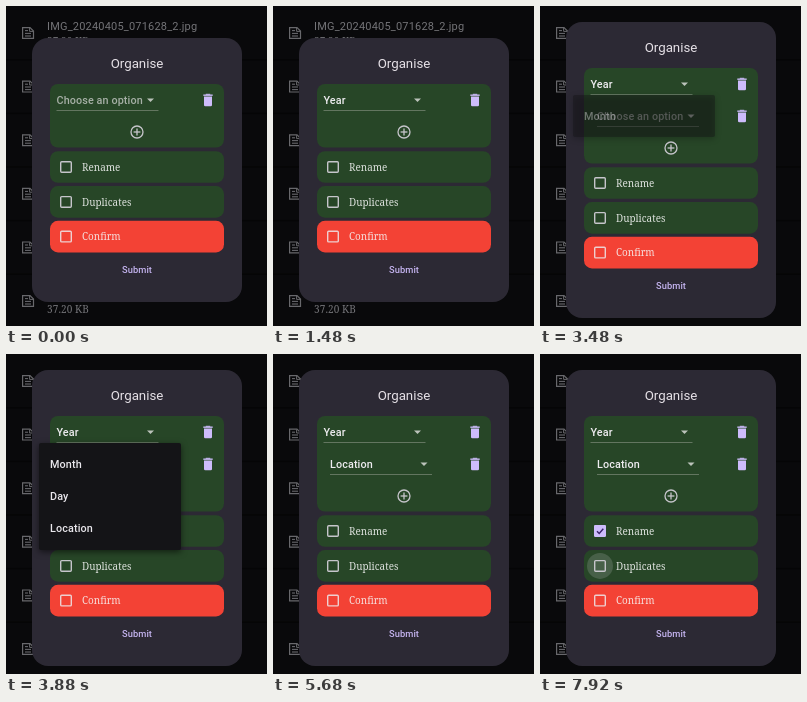
Animation of 261 by 320 pixels, one loop 8000 ms. Source, as an HTML page with a canvas:

```html
<!DOCTYPE html>
<html lang="en">
<head>
<meta charset="utf-8">
<title>Organise dialog</title>
<style>
html, body { margin: 0; width: 100%; height: 100%; overflow: hidden; background: #09090b; }
canvas { display: block; width: 261px; height: 320px; }
</style>
</head>
<body>
<canvas id="stage"></canvas>
<script>
const W = 261, H = 320, LOOP = 8000;
const canvas = document.getElementById('stage');
const ctx = canvas.getContext('2d');
const ratio = window.devicePixelRatio || 1;
canvas.width = W * ratio;
canvas.height = H * ratio;

const SANS = 'Roboto, sans-serif', SERIF = '"Noto Serif", serif';
const GREEN = '#274627', RED = '#f34235', LILAC = '#cdbcfb', LIGHT = '#eeecf0', GREY = '#c6c5cb';
const ADD_ROW = 2760, TICK = 6790;
const menus = [
  { open: 335, close: 1361, x: 33, y: 73, w: 135, items: ['Year', 'Month', 'Day', 'Location'] },
  { open: 3450, close: 4681, x: 33, y: 89, w: 142, items: ['Month', 'Day', 'Location'] }
];

const clamp = v => Math.max(0, Math.min(1, v));
const phase = (t, start, length) => clamp((t - start) / length);
const easeOut = p => 1 - (1 - p) ** 3;

function withAlpha(alpha, draw) {
  ctx.save();
  ctx.globalAlpha *= alpha;
  draw();
  ctx.restore();
}

function box(x, y, w, h, r, color) {
  ctx.beginPath();
  ctx.roundRect(x, y, w, h, r);
  ctx.fillStyle = color;
  ctx.fill();
}

function poly(points, color, stroke) {
  ctx.beginPath();
  points.forEach(([x, y]) => ctx.lineTo(x, y));
  if (stroke) {
    ctx.strokeStyle = color;
    ctx.lineWidth = stroke;
    ctx.stroke();
  } else {
    ctx.fillStyle = color;
    ctx.fill();
  }
}

// y is the vertical middle of the capitals
function label(str, x, y, size, color, { font = SANS, weight = 400, align = 'left', gap = 0 } = {}) {
  ctx.font = `${weight} ${size}px ${font}`;
  ctx.letterSpacing = gap + 'px';
  ctx.textAlign = align;
  ctx.fillStyle = color;
  ctx.fillText(str, x, y + size * 0.356);
}

function fileIcon(y) {
  const c = '#68686c';
  poly([[16.6, y - 5.4], [24, y - 5.4], [27.5, y - 1.9], [27.5, y + 5.4],
    [16.6, y + 5.4], [16.6, y - 6]], c, 1.2);
  poly([[23.6, y - 5], [23.6, y - 1.6], [27.4, y - 1.6]], c, 1);
  poly([[19, y - 2.4], [22, y - 2.4]], c, 1.1);
  poly([[19, y + 0.4], [25, y + 0.4]], c, 1.1);
  poly([[19, y + 3], [25, y + 3]], c, 1.1);
}

function fileList() {
  ctx.fillStyle = '#09090b';
  ctx.fillRect(0, 0, W, H);
  for (let i = 0; i < 6; i++) {
    const y = 27 + i * 53.6;
    ctx.fillStyle = '#050506';
    ctx.fillRect(0, y + 26, W, 1.5);
    fileIcon(y);
    label('IMG_20240405_071628_2.jpg', 41, y - 7, 11, '#747478', { gap: 0.19 });
    label('37.20 KB', 41, y + 8, 10, '#747478', { font: SERIF, gap: 0.1 });
  }
}

function trash(x, y) {
  box(x - 4, y - 3.4, 8, 9.6, [0, 0, 1.3, 1.3], LILAC);
  box(x - 4.7, y - 5.5, 9.4, 1.35, 0, LILAC);
  box(x - 2.2, y - 6.2, 4.4, 1, 0, LILAC);
}

function plus(x, y) {
  ctx.beginPath();
  ctx.arc(x, y, 6, 0, Math.PI * 2);
  ctx.strokeStyle = GREY;
  ctx.lineWidth = 1.3;
  ctx.stroke();
  poly([[x - 3.4, y], [x + 3.4, y]], GREY, 1.3);
  poly([[x, y - 3.4], [x, y + 3.4]], GREY, 1.3);
}

function dropdown(x, y, value) {
  label(value || 'Choose an option', x, y, 10.8, value ? LIGHT : '#a7b0a7', { weight: 500, gap: 0.1 });
  ctx.fillStyle = '#72836f';
  ctx.fillRect(x, y + 10, 102, 0.8);
  poly([[x + 90.5, y - 1.5], [x + 97.5, y - 1.5], [x + 94, y + 2]], '#bcc3bb');
  trash(202, y);
}

function ripple(t, start, x, y, rx, ry, alpha) {
  const fade = 1 - phase(t, start + 140, 220);
  if (t < start || !fade) return;
  const grow = 0.65 + 0.35 * easeOut(phase(t, start, 60));
  withAlpha(alpha * fade, () => {
    ctx.beginPath();
    ctx.ellipse(x, y, rx * grow, ry * grow, 0, 0, Math.PI * 2);
    ctx.fillStyle = '#dcd6e4';
    ctx.fill();
  });
}

function option(name, y, color, checked, pressAt, t) {
  box(44, y, 174, 31.6, 8, color);
  const mid = y + 15.8;
  if (pressAt) ripple(t, pressAt, 60, mid, 13, 13, 0.18);
  const edge = color === RED ? '#eecfd0' : GREY;
  ctx.beginPath();
  ctx.roundRect(54.7, mid - 5.3, 10.6, 10.6, 1);
  ctx.strokeStyle = edge;
  ctx.lineWidth = 1.4;
  ctx.stroke();
  if (checked) withAlpha(checked, () => {
    box(54, mid - 6, 12, 12, 1.4, LILAC);
    const a = [57, mid + 0.2], b = [59.2, mid + 2.5], c = [63.3, mid - 2.3];
    poly([a, b, c], '#38206b', 1.4);
  });
  label(name, 76, mid + 0.3, 9.9, color === RED ? '#f6dedc' : '#dfe3df', { font: SERIF });
}

function dialog(t) {
  const grown = t >= ADD_ROW;
  const top = grown ? 16 : 32;
  const bottom = H - 8 - (grown ? 0 : 16);
  box(26, top, 210, bottom - top, 16, '#2c2934');
  label('Organise', 131, top + 25, 13.3, '#e6e1e7', { align: 'center' });

  box(44, top + 46, 174, grown ? 95.5 : 63.5, 8, GREEN);
  dropdown(50.5, top + 62, t >= menus[0].close && 'Year');
  if (grown) dropdown(57, top + 94, t >= menus[1].close && 'Location');
  const plusY = grown ? 142 : 126;
  ripple(t, 2645, 131, plusY, 21, 11.5, 0.07);
  plus(131, plusY);

  const first = grown ? 161.2 : 145.2;
  option('Rename', first, GREEN, phase(t, TICK, 130), 6670, t);
  option('Duplicates', first + 34.9, GREEN, 0, 7870, t);
  option('Confirm', first + 69.6, RED, 0, 0, t);
  label('Submit', 131, bottom - 32, 9.3, '#c5b4f0', { weight: 500, align: 'center', gap: 0.08 });
}

function menu(m, t) {
  if (t < m.open || t > m.close + 50) return;
  const p = phase(t, m.open, 300);
  const alpha = phase(p, 0, 0.25) * (1 - phase(t, m.close, 46));
  const n = m.items.length;
  const full = n * 32 + 11;
  const h = 42 + (full - 42) * easeOut(phase(p, 0.25, 0.25));
  withAlpha(alpha, () => {
    ctx.save();
    ctx.shadowColor = 'rgba(0,0,0,.55)';
    ctx.shadowBlur = 6 * ratio;
    ctx.shadowOffsetY = 2 * ratio;
    box(m.x, m.y, m.w, h, 2, '#141417');
    ctx.restore();
    ctx.beginPath();
    ctx.rect(m.x, m.y, m.w, h);
    ctx.clip();
    const unit = 0.5 / (n + 1.5);
    m.items.forEach((item, i) => {
      const shown = i ? phase(p, 0.5 + (i + 1) * unit, 1.5 * unit) : 1;
      withAlpha(shown, () =>
        label(item, m.x + 11, m.y + 21 + i * 32, 10.8, '#e9e7ec', { weight: 500, gap: 0.12 }));
    });
  });
}

function draw(t) {
  ctx.setTransform(ratio, 0, 0, ratio, 0, 0);
  fileList();
  dialog(t);
  menus.forEach(m => menu(m, t));
}

const begin = performance.now();
function tick() {
  draw((performance.now() - begin) % LOOP);
  requestAnimationFrame(tick);
}
tick();
</script>
</body>
</html>
```
